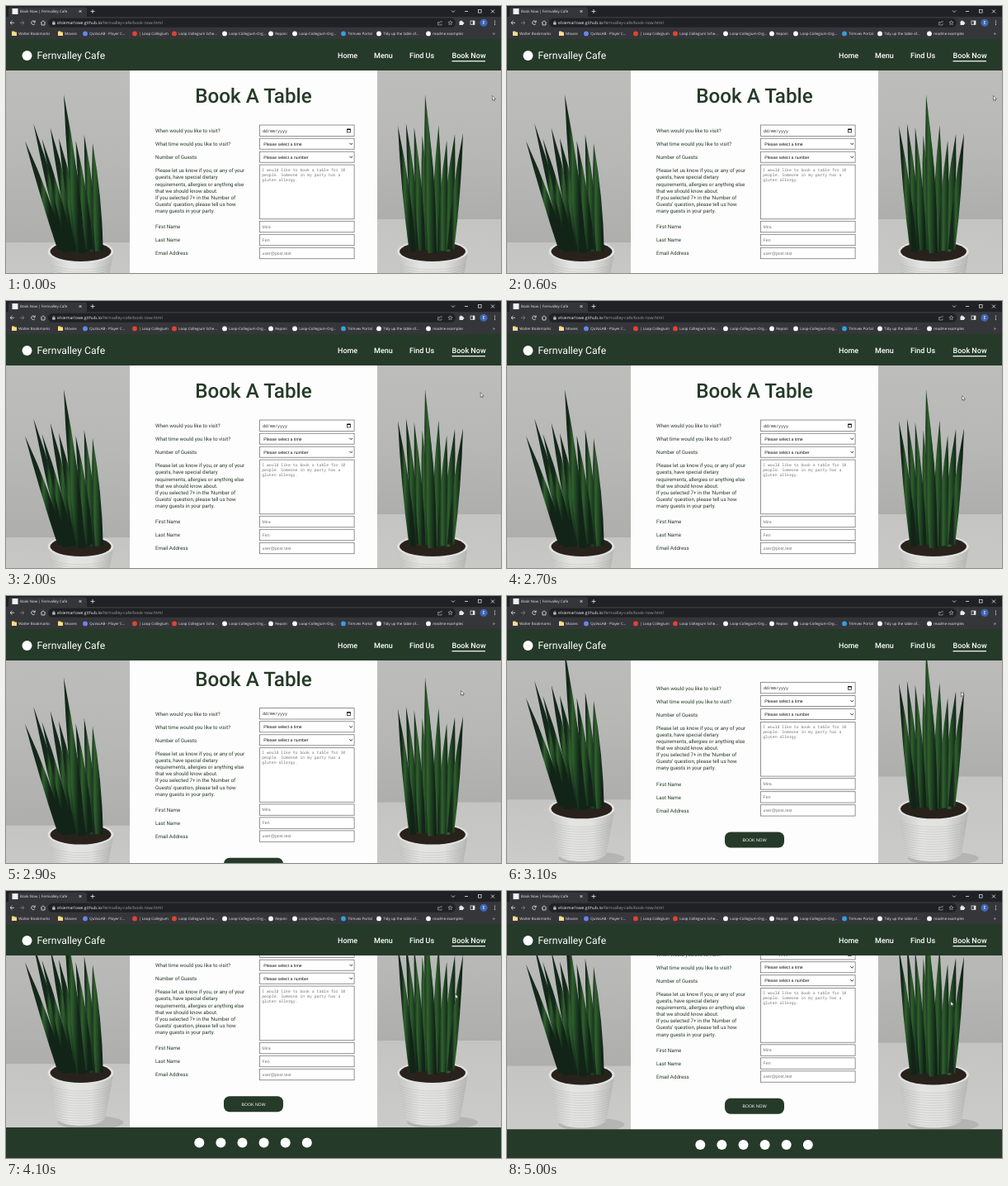
Write an HTML page with a canvas that moves like this. It is 600 by 323 pixels and loops after 5100 ms.

```html
<!DOCTYPE html>
<html lang="en">
<head>
<meta charset="utf-8">
<title>Book Now | Fernvalley Cafe</title>
<style>
html, body { margin: 0; width: 100%; height: 100%; overflow: hidden; background: #253a28; }
canvas { display: block; width: 600px; height: 323px; }
</style>
</head>
<body>
<canvas id="stage"></canvas>
<script>
const W = 600, H = 323, LOOP = 5100, STEP = 100;
const canvas = document.getElementById('stage');
const c = canvas.getContext('2d');
const dpr = window.devicePixelRatio || 1;
canvas.width = W * dpr;
canvas.height = H * dpr;

const GREEN = '#253a28', BAR = '#35363a', DARK = '#202124', PALE = '#e8eaed', DIM = '#bdc1c6';
const BODY = 'Roboto, sans-serif';
const UI = '"Open Sans", "Noto Sans", sans-serif';
const FORM = '"Liberation Sans", Arial, sans-serif';
const MONO = '"Noto Sans Mono", "DejaVu Sans Mono", monospace';

// ---- motion ----

const lerp = (a, b, k) => a + (b - a) * k;

// Eased progress from 0 to 1
function ease(t, start, length) {
  const k = Math.min(1, Math.max(0, (t - start) / length));
  return k * k * (3 - 2 * k);
}

const scrollAt = t =>
  45.5 * ease(t, 2790, 400) + 31.5 * ease(t, 3620, 400) - 8 * ease(t, 4850, 400);

function pointerAt(t) {
  const a = ease(t, 1750, 600), b = ease(t, 2900, 800), d = ease(t, 4800, 300);
  return [589.5 - 38 * a - 7 * b - 9 * d, 108.5 + 6 * a + 10 * b + 12 * d];
}

// ---- drawing helpers ----

function rect(x, y, w, h, fill) {
  c.fillStyle = fill;
  c.fillRect(x, y, w, h);
}

function round(x, y, w, h, r, fill) {
  c.beginPath();
  c.roundRect(x, y, w, h, r);
  c.fillStyle = fill;
  c.fill();
}

function oval(x, y, rx, ry, fill) {
  c.beginPath();
  c.ellipse(x, y, rx, ry, 0, 0, 7);
  c.fillStyle = fill;
  c.fill();
}

const disc = (x, y, r, fill) => oval(x, y, r, r, fill);

function line(points, color = PALE, width = 0.8) {
  c.beginPath();
  for (let i = 0; i < points.length; i += 2) c.lineTo(points[i], points[i + 1]);
  c.strokeStyle = color;
  c.lineWidth = width;
  c.stroke();
}

function frame(x, y, w, h, color = PALE) {
  c.strokeStyle = color;
  c.lineWidth = 0.7;
  c.strokeRect(x, y, w, h);
}

function text(str, x, y, size, family, color, weight = 400, align = 'left') {
  c.font = `${weight} ${size}px ${family}`;
  c.textAlign = align;
  c.fillStyle = color;
  c.fillText(str, x, y);
}

// Evenly spaced colour stops
function blend(x0, y0, x1, y1, ...colors) {
  const g = c.createLinearGradient(x0, y0, x1, y1);
  colors.forEach((col, i) => g.addColorStop(i / (colors.length - 1), col));
  return g;
}

function cross(x, y, r) {
  line([x - r, y - r, x + r, y + r]);
  line([x - r, y + r, x + r, y - r]);
}

// ---- browser window ----

const MARKS = [
  [10, 'Walter Bookmarks'], [66, 'Movies'], [96, 'QuVaLAB - Player C...', '#6587e8'],
  [156, '| Loop Collegium', '#e2432f'], [204, 'Loop Collegium Sche...', '#e2432f'],
  [265, 'Loop-Collegium-Org...', '#fff'], [321, 'Reponi', '#fff'],
  [350, 'Loop-Collegium-Org...', '#fff'], [409, 'Trimvex Portal', '#35a0dc'],
  [452, 'Tidy up the table of...', '#fff'], [512, 'readme examples', '#fff']
];

function folder(x) {
  round(x - 3, 30.5, 3.5, 3, 0.6, '#f5d479');
  round(x - 3, 31.4, 6, 4.6, 0.6, '#f9dd88');
}

function arrow(x, dir, color) {
  line([x - 2.5 * dir, 20.3, x + 2.5 * dir, 20.3], color);
  line([x, 17.9, x + 2.5 * dir, 20.3, x, 22.7], color);
}

function star(x, y) {
  c.beginPath();
  for (let i = 0; i < 10; i++) {
    const r = i % 2 ? 1.2 : 2.7, a = i * Math.PI / 5 - Math.PI / 2;
    c.lineTo(x + r * Math.cos(a), y + r * Math.sin(a));
  }
  c.closePath();
  c.stroke();
}

function tabs() {
  rect(0, 0, W, 13, DARK);
  rect(0, 13, W, 27, BAR);
  round(3, 1.5, 95, 13, [3, 3, 0, 0], BAR);
  rect(7.5, 3, 7, 7, '#f2f2f2');
  text('Book Now | Fernvalley Cafe', 17, 8.3, 4.45, UI, PALE);
  cross(90, 6.5, 1.5);
  line([102.5, 6.5, 107.5, 6.5]);
  line([105, 4, 105, 9]);
  line([540, 5.5, 542, 7.5, 544, 5.5]);
  line([556, 6.5, 560, 6.5]);
  frame(572.5, 4.5, 3.6, 3.6);
  cross(590, 6.5, 2);
}

function toolbar() {
  arrow(7.5, -1, PALE);
  arrow(19.5, 1, '#85868a');
  c.beginPath();
  c.arc(33, 20.3, 2.3, 0.5, 5.6);
  c.strokeStyle = PALE;
  c.stroke();
  line([35.2, 17.5, 35.2, 19.6, 33.2, 19.6]);
  line([42, 20.4, 45, 17.8, 48, 20.4]);
  line([43, 20, 43, 23, 47, 23, 47, 20]);

  round(51, 14.8, 494, 11, 5.5, DARK);
  rect(56.2, 19.8, 3.4, 2.8, DIM);
  c.beginPath();
  c.arc(57.9, 19.7, 1.1, Math.PI, 0);
  c.strokeStyle = DIM;
  c.stroke();
  text('elsiemarlowe.github.io', 62, 22.2, 5.1, UI, PALE);
  const end = 62 + c.measureText('elsiemarlowe.github.io').width;
  text('/fernvalley-cafe/book-now.html', end, 22.2, 5.1, UI, '#9aa0a6');

  line([525, 19.5, 523.6, 19.5, 523.6, 23, 528, 23, 528, 21.5], DIM, 0.6);
  line([525, 21.2, 526, 19.2, 529, 18.8], DIM, 0.6);
  star(538.5, 20.4);
  round(549.5, 18.6, 4.6, 4.4, 0.6, PALE);
  disc(551.6, 18.4, 1, PALE);
  disc(554.3, 20.8, 1, PALE);
  frame(563, 18, 5, 4.6);
  rect(565.8, 18, 2.2, 4.6, PALE);
  disc(579, 20.3, 4.6, '#3f66b5');
  text('E', 579, 22.3, 5.6, UI, '#fff', 400, 'center');
  for (let i = -1; i < 2; i++) disc(592.5, 20.3 + 2.1 * i, 0.6, PALE);
}

function bookmarks() {
  for (const [x, label, color] of MARKS) {
    if (color) disc(x, 33.4, 2.9, color);
    else folder(x);
    text(label, x + 5.2, 35, 4.45, UI, PALE);
  }
  text('»', 590, 35, 5.5, UI, PALE);
}

function siteHeader() {
  rect(0, 40, W, 38, GREEN);
  disc(25.5, 60, 6, '#fff');
  text('Fernvalley Cafe', 37.5, 64.3, 12.2, BODY, '#fff');
  const nav = [['Home', 402], ['Menu', 446], ['Find Us', 489], ['Book Now', 540.5]];
  for (const [label, x] of nav) text(label, x, 63, 9, BODY, '#fff', 500);
  rect(540.5, 66.1, 40.5, 1.2, '#fff');
}

// ---- plants ----

function random(seed) {
  return () => (seed = seed * 16807 % 2147483647) / 2147483647;
}

function leaf(tx, ty, bx, by, w) {
  const mx = lerp(tx, bx, 0.55), my = lerp(ty, by, 0.5);
  c.beginPath();
  c.moveTo(tx, ty);
  c.quadraticCurveTo(mx - w * 0.6, my, bx - w * 0.4, by);
  c.lineTo(bx + w * 0.4, by);
  c.quadraticCurveTo(mx + w * 0.6, my, tx, ty);
  c.fillStyle = blend(mx - w * 0.5, my, mx + w * 0.5, my, '#14291a', '#31602d', '#1d4222', '#122417');
  c.fill();
}

// A fan of leaves around one tall leaf
function plant(left, right, foot, top, seed) {
  const rnd = random(seed), n = 9;
  for (let pass = 1; pass >= 0; pass--) {
    for (let i = pass; i < n; i += 2) {
      const k = i / (n - 1);
      leaf(lerp(left, right, k), 142 + 26 * rnd(), foot + 23 * (2 * k - 1), 294 + 4 * rnd(), 10 + 3 * rnd());
    }
  }
  leaf(top, 107, foot + 1, 299, 13);
}

function pot(x, r, foot) {
  c.beginPath();
  c.moveTo(x - r, 297);
  c.lineTo(x - foot - 3, 351);
  c.quadraticCurveTo(x - foot, 360, x, 361);
  c.quadraticCurveTo(x + foot, 360, x + foot + 3, 351);
  c.lineTo(x + r, 297);
  c.closePath();
  c.fillStyle = blend(x - r, 0, x + r, 0, '#c4c4c3', '#e4e4e3', '#e0e0df', '#b4b4b3');
  c.fill();
  c.save();
  c.clip();
  for (let y = 312; y < 362; y += 3) {
    c.beginPath();
    c.ellipse(x, y - 4, r, 11, 0, 0, Math.PI);
    c.strokeStyle = 'rgba(140,140,140,.28)';
    c.lineWidth = 0.7;
    c.stroke();
  }
  c.restore();
  oval(x, 297, r, 14, '#e2e2e1');
  oval(x, 297, r - 3, 12, '#29221c');
}

function photo(x, edge, potArgs, plantArgs) {
  c.save();
  c.beginPath();
  c.rect(x, 78, 150, 285);
  c.clip();
  rect(x, 78, 150, 285, blend(0, 78, 0, edge, '#bdbdbc', '#b8b8b7', '#aeaead'));
  rect(x, edge, 150, 363 - edge, blend(0, edge, 0, 363, '#c4c4c3', '#cbcbca'));
  oval(potArgs[0] + 12, 357, potArgs[1], 8, 'rgba(100,100,100,.22)');
  pot(...potArgs);
  plant(...plantArgs);
  c.restore();
}

// ---- form ----

const QUESTIONS = ['When would you like to visit?', 'What time would you like to visit?', 'Number of Guests'];
const DETAILS = ['First Name', 'Last Name', 'Email Address'];
const ANSWERS = ['Mira', 'Fen', 'user@post.test'];
const NOTE = ['Please let us know if you, or any of your', 'guests, have special dietary',
  'requirements, allergies or anything else', 'that we should know about.',
  "If you selected 7+ in the 'Number of", "Guests' question, please tell us how", 'many guests in your party.'];
const HINT = ['I would like to book a table for 10', 'people. Someone in my party has a', 'gluten allergy.'];

function field(y, h) {
  rect(307, y, 115.5, h, '#767676');
  rect(307.8, y + 0.8, 113.9, h - 1.6, '#fff');
}

function select(y, label) {
  field(y, 13.8);
  text(label, 312.3, y + 8.7, 5.2, FORM, '#111');
  line([416.4, y + 6, 418.2, y + 7.8, 420, y + 6], '#111', 0.9);
}

function datePicker(y) {
  field(y, 14.2);
  text('dd/mm/yyyy', 311, y + 8.9, 5, MONO, '#222');
  frame(413.6, y + 5.5, 4, 3.8, '#111');
  rect(413.4, y + 5, 4.4, 1.4, '#111');
}

function lines(list, x, y, gap, size, family, color) {
  list.forEach((s, i) => text(s, x, y + i * gap, size, family, color));
}

function form() {
  rect(150, 78, 300, 285, '#fdfdfd');
  text('Book A Table', 300, 117, 24.2, BODY, GREEN, 500, 'center');
  lines(QUESTIONS, 181, 153.4, 15.95, 6.2, BODY, GREEN);
  lines(NOTE, 181, 201.2, 8.15, 6.2, BODY, GREEN);
  lines(DETAILS, 181, 269.3, 16, 6.2, BODY, GREEN);

  datePicker(143.6);
  select(159.8, 'Please select a time');
  select(175.8, 'Please select a number');
  field(191.7, 66.4);
  lines(HINT, 310.2, 199.7, 6.1, 4.82, MONO, '#757575');
  ANSWERS.forEach((s, i) => field(259.9 + 16 * i, 14.2));
  lines(ANSWERS, 310.6, 268.8, 16, 5.2, FORM, '#757575');

  round(264, 325.2, 72, 19, 7, GREEN);
  text('BOOK NOW', 300, 336.6, 5.2, FORM, '#fff', 400, 'center');
}

function footer() {
  rect(0, 363, W, 37, GREEN);
  for (let i = 0; i < 6; i++) disc(234.3 + 26.1 * i, 381.5, 6, '#fff');
}

function pointer(x, y) {
  c.beginPath();
  [[0, 0], [0, 5.6], [1.3, 4.4], [2.2, 6.3], [3, 5.9], [2.2, 4.1], [4, 4]]
    .forEach(([dx, dy]) => c.lineTo(x + dx, y + dy));
  c.closePath();
  c.fillStyle = '#fff';
  c.fill();
  c.strokeStyle = '#222';
  c.lineWidth = 0.5;
  c.stroke();
}

function draw(t) {
  c.setTransform(dpr, 0, 0, dpr, 0, 0);
  c.textRendering = 'geometricPrecision';
  c.save();
  c.beginPath();
  c.rect(0, 78, W, H - 78);
  c.clip();
  c.translate(0, -scrollAt(t));
  photo(0, 286, [90.5, 40, 27], [23, 105, 90, 70, 7]);
  photo(450, 258, [517, 43, 31], [475, 554, 516, 508, 23]);
  form();
  footer();
  c.restore();
  tabs();
  toolbar();
  bookmarks();
  siteHeader();
  pointer(...pointerAt(t));
}

const start = performance.now();
let last = -1;
function tick() {
  const t = Math.floor((performance.now() - start) % LOOP / STEP) * STEP;
  if (t !== last) draw(last = t);
  requestAnimationFrame(tick);
}
tick();
</script>
</body>
</html>
```
